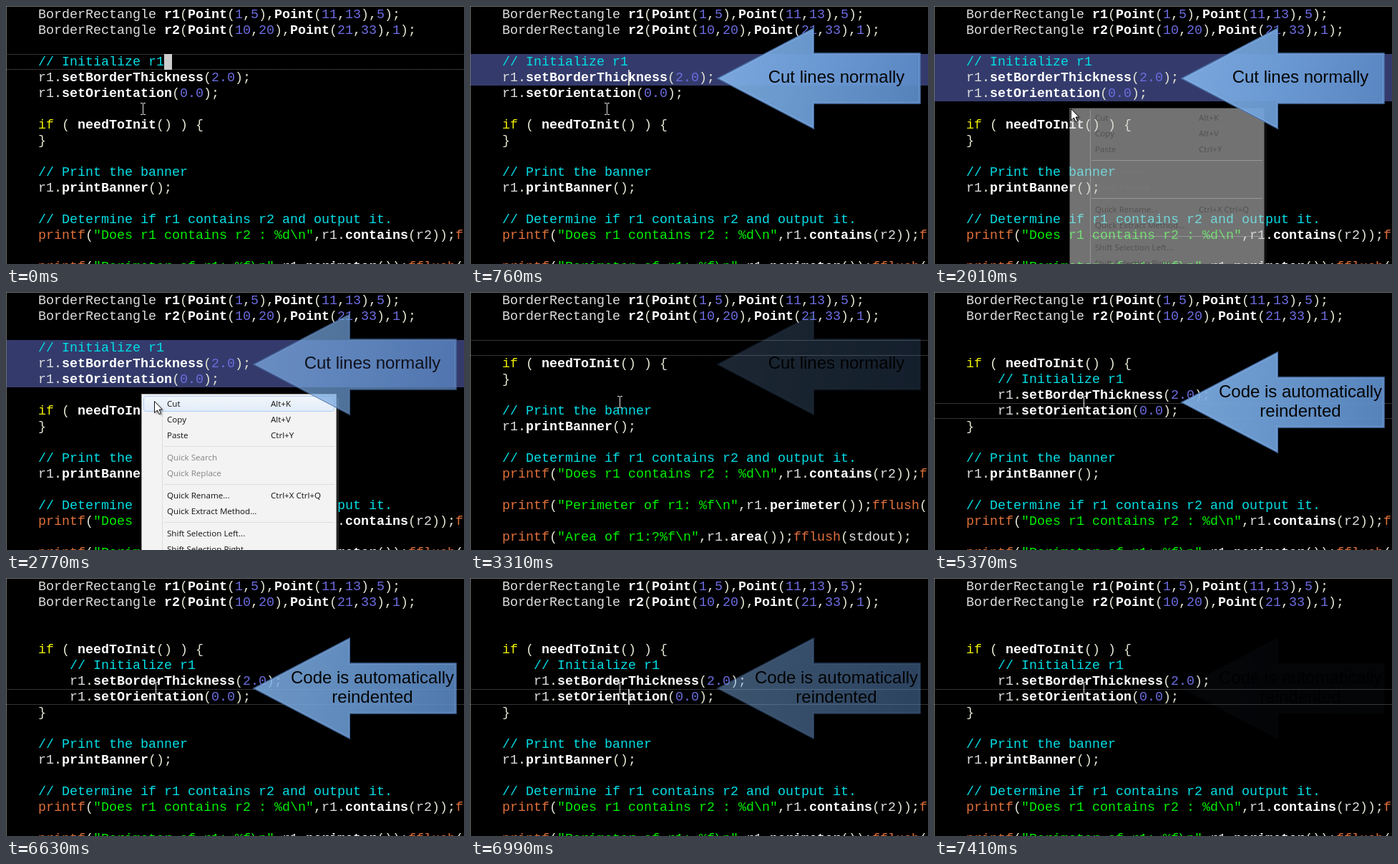
Write an HTML page with a canvas that moves like this. It is 640 px wide and 360 px high and loops after 7470 ms.

```html
<!DOCTYPE html>
<html lang="en">
<head>
<meta charset="utf-8">
<title>Cut and paste with reindent</title>
<style>
html, body { margin: 0; width: 100%; height: 100%; overflow: hidden; background: #000; }
canvas { display: block; width: 640px; height: 360px; }
</style>
</head>
<body>
<canvas id="stage" width="640" height="360"></canvas>
<script>
const ctx = document.getElementById('stage').getContext('2d');
const LOOP = 7470, X0 = 45, COL = 11, ROW = 22;
const MONO = '18.33px "Liberation Mono", monospace';
const CARET_X = X0 + 16 * COL;
const rowTop = r => 1 + r * ROW;
const clamp = v => Math.max(0, Math.min(1, v));

const head = [
  'BorderRectangle r1(Point(1,5),Point(11,13),5);',
  'BorderRectangle r2(Point(10,20),Point(21,33),1);',
  ''
];
const moved = ['// Initialize r1', 'r1.setBorderThickness(2.0);', 'r1.setOrientation(0.0);'];
const test = 'if ( needToInit() ) {';
const tail = [
  '}', '',
  '// Print the banner', 'r1.printBanner();', '',
  '// Determine if r1 contains r2 and output it.',
  'printf("Does r1 contains r2 : %d\\n",r1.contains(r2));fflush(stdout);', '',
  'printf("Perimeter of r1: %f\\n",r1.perimeter());fflush(stdout);', '',
  'printf("Area of r1:?%f\\n",r1.area());fflush(stdout);'
];
const before = [...head, ...moved, '', test, ...tail];
const cut = [...head, '', test, ...tail];
const pasted = [...head, '', test, ...moved.map(s => '    ' + s), ...tail];

const TOKEN = /\/\/.*|"[^"]*"|[A-Za-z_]\w*|\d+(\.\d+)?|[^\s\w]/g;

function style(word, next) {
  if (word.startsWith('//')) return ['#00dfe6'];
  if (word[0] === '"') return ['#00f000'];
  if (/^\d/.test(word)) return ['#6c6ce0'];
  if (word === 'if') return ['#f0f000'];
  if (/^(printf|fflush)$/.test(word)) return ['#e0703a'];
  if (next === '(' && /^\w/.test(word)) return ['#fff', true];
  return /^\w/.test(word) ? ['#dedede'] : ['#e6e6d6'];
}

function put(str, col, row, color, bold) {
  ctx.font = (bold ? 'bold ' : '') + MONO;
  ctx.fillStyle = color;
  ctx.fillText(str, X0 + col * COL, rowTop(row) + 16);
}

function drawCode(lines) {
  lines.forEach((line, row) => {
    for (const m of line.matchAll(TOKEN)) {
      const [color, bold] = style(m[0], line[m.index + m[0].length]);
      put(m[0], m.index, row, color, bold);
    }
  });
}

function currentLine(row) {
  ctx.fillStyle = '#686868';
  for (let x = 0; x < 640; x += 2) {
    ctx.fillRect(x, rowTop(row), 1, 1);
    ctx.fillRect(x + 1, rowTop(row) + 21, 1, 1);
  }
}

function selectRows(first, last) {
  ctx.fillStyle = '#343b6c';
  ctx.fillRect(0, rowTop(first), 640, (last - first + 1) * ROW);
}

function caret(row, width = 2) {
  ctx.fillStyle = '#cccccc';
  ctx.fillRect(CARET_X, rowTop(row), width, ROW);
}

function iBeam(x, y) {
  ctx.fillStyle = '#e8e8e8';
  ctx.fillRect(x, y - 7, 1, 15);
  for (const dy of [-8, 8]) {
    ctx.fillRect(x - 3, y + dy, 3, 1);
    ctx.fillRect(x + 1, y + dy, 3, 1);
  }
}

function path(points) {
  ctx.beginPath();
  points.forEach(([x, y]) => ctx.lineTo(x, y));
  ctx.closePath();
}

function pointer(x, y) {
  ctx.save();
  ctx.translate(x + 0.5, y + 0.5);
  path([[0, 0], [0, 16], [4, 12.5], [6.5, 18], [9, 17], [6.5, 11.5], [11, 11.5]]);
  ctx.shadowColor = 'rgba(0,0,0,.4)';
  ctx.shadowBlur = 3;
  ctx.shadowOffsetX = ctx.shadowOffsetY = 2;
  ctx.fillStyle = '#fff';
  ctx.fill();
  ctx.shadowColor = 'transparent';
  ctx.strokeStyle = '#111';
  ctx.lineWidth = 1;
  ctx.stroke();
  ctx.restore();
}

const items = [
  ['Cut', 156, 'Alt+K'], ['Copy', 178, 'Alt+V'], ['Paste', 200, 'Ctrl+Y'],
  ['Quick Search', 231], ['Quick Replace', 253],
  ['Quick Rename...', 284, 'Ctrl+X Ctrl+Q'], ['Quick Extract Method...', 306],
  ['Shift Selection Left...', 337], ['Shift Selection Right...', 359]
];

function menu(alpha, hover) {
  ctx.save();
  ctx.globalAlpha = alpha;
  ctx.fillStyle = 'rgba(70,70,70,.5)';
  ctx.fillRect(461, 147, 4, 220);
  ctx.fillStyle = '#979797';
  ctx.fillRect(189, 142, 273, 230);
  ctx.fillStyle = '#f3f3f3';
  ctx.fillRect(190, 143, 271, 230);
  ctx.fillStyle = '#dedede';
  ctx.fillRect(218, 145, 1, 220);
  for (const y of [215, 268, 321]) ctx.fillRect(220, y, 239, 1);
  if (hover) {
    const g = ctx.createLinearGradient(0, 145, 0, 167);
    g.addColorStop(0, '#f2f6fb');
    g.addColorStop(1, '#e1ecf8');
    ctx.beginPath();
    ctx.roundRect(192.5, 145.5, 266, 21, 3);
    ctx.fillStyle = g;
    ctx.fill();
    ctx.strokeStyle = '#aecff7';
    ctx.lineWidth = 1;
    ctx.stroke();
  }
  ctx.font = '11.6px "Open Sans", sans-serif';
  for (const [label, y, keys] of items) {
    ctx.fillStyle = /Search|Replace/.test(label) ? '#848484' : '#111';
    ctx.fillText(label, 225, y + 4);
    if (keys) ctx.fillText(keys, 370, y + 4);
  }
  ctx.restore();
}

// Callout is painted on its own layer so that it fades as a whole.
function makeCallout(lines) {
  const layer = document.createElement('canvas');
  layer.width = 640;
  layer.height = 200;
  const c = layer.getContext('2d');
  const shape = new Path2D('M345 72 L481 1 V36.5 H629.5 V107.5 H481 V143 Z');
  const g = c.createLinearGradient(345, 0, 630, 60);
  g.addColorStop(0, '#82b2e8');
  g.addColorStop(0.5, '#70a2dc');
  g.addColorStop(1, '#5e8ecb');
  c.globalAlpha = 0.92;
  c.fillStyle = g;
  c.fill(shape);
  c.save();
  c.clip(shape);
  c.strokeStyle = 'rgba(150,190,235,.45)';
  c.lineWidth = 5;
  c.stroke(shape);
  c.strokeStyle = '#3c639e';
  c.lineWidth = 2.5;
  c.stroke(shape);
  c.restore();
  c.globalAlpha = 1;
  c.font = '24px "Liberation Sans", sans-serif';
  c.textAlign = 'center';
  c.fillStyle = '#050505';
  const first = lines.length > 1 ? 65 : 78;
  lines.forEach((s, i) => c.fillText(s, 512, first + i * 27));
  return layer;
}

const callouts = [
  { layer: makeCallout(['Cut lines normally']), y: 29, from: 60, out: 2590, span: 1020 },
  { layer: makeCallout(['Code is automatically', 'reindented']), y: 82, from: 4870, out: 6630, span: 870 }
];

function drawCallout({ layer, y, from, out, span }, t) {
  if (t < from) return;
  const rise = clamp((Math.floor((t - from) / 60) + 1) / 5);
  const fall = t < out ? 1 : clamp(1 - (Math.floor((t - out) / 60) + 1) * 60 / span);
  if (!fall) return;
  ctx.globalAlpha = rise * fall;
  ctx.drawImage(layer, 0, y);
  ctx.globalAlpha = 1;
}

const within = (t, ...spans) => spans.some(([a, b]) => t >= a && t < b);

function drawEditor(t) {
  if (t < 2830) {
    const last = t < 760 ? 3 : t < 890 ? 4 : 5;
    if (t < 430) currentLine(3);
    else selectRows(3, last);
    drawCode(before);
    if (t < 430) caret(3, COL);
    else if (!within(t, [1420, 1950]) && t < 2010) caret(last);
  } else if (t < 4870) {
    const row = t < 4010 ? 3 : 4;
    currentLine(row);
    drawCode(cut);
    if (t >= 4340) put('()', 15, 4, '#fff', true);
    if (!within(t, [3310, 3810])) caret(row);
  } else {
    currentLine(7);
    drawCode(pasted);
    if (!within(t, [5370, 5900], [6430, 6990], [7410, LOOP])) caret(7);
  }
}

function drawMouse(t) {
  if (t < 2010) iBeam(191, 143);
  else if (t >= 2830) iBeam(209, 153);
  else {
    menu(clamp((Math.floor((t - 2010) / 60) + 1) / 3), t >= 2330);
    if (t < 2330) pointer(191, 143);
    else if (t < 2530) pointer(201, 149);
    else pointer(207, 152);
  }
}

function draw(t) {
  ctx.fillStyle = '#000';
  ctx.fillRect(0, 0, 640, 360);
  drawEditor(t);
  ctx.fillStyle = '#6c6c6c';
  ctx.fillRect(0, 0, 640, 1);
  ctx.fillRect(0, 0, 1, 360);
  drawMouse(t);
  callouts.forEach(c => drawCallout(c, t));
}

const start = performance.now();
function tick() {
  draw((performance.now() - start) % LOOP);
  requestAnimationFrame(tick);
}
tick();
</script>
</body>
</html>
```
